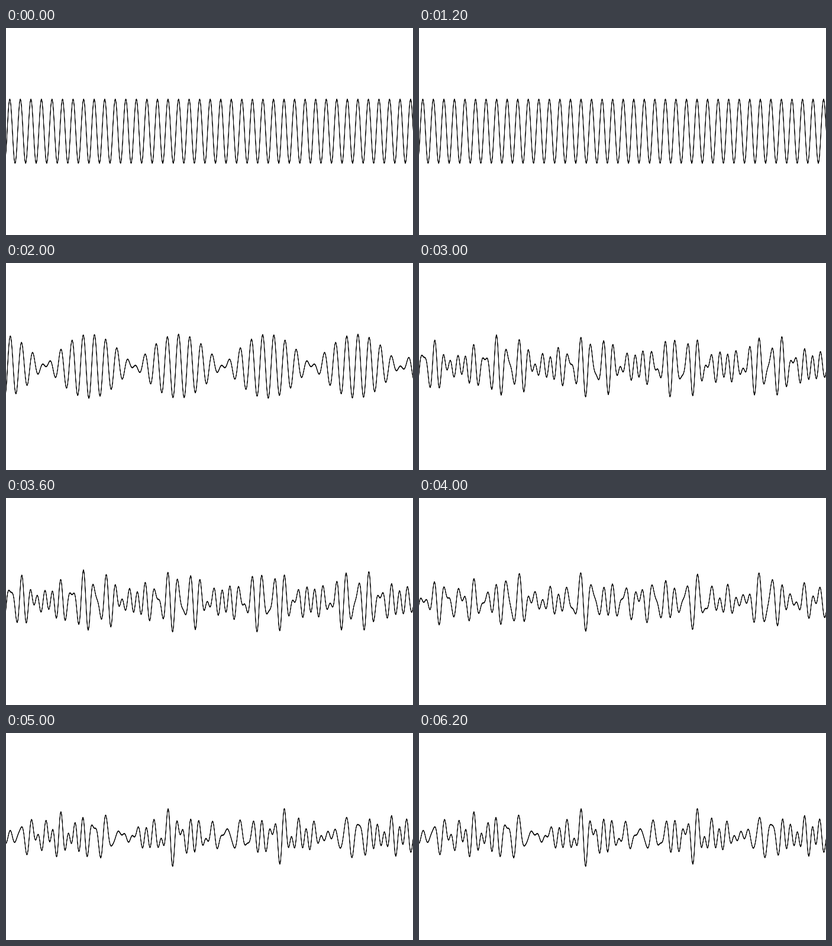
Animation of 688x350 px, one loop 7000 ms. Source, as a matplotlib script:

```python
import matplotlib.pyplot as plt
import numpy as np
from matplotlib.animation import FuncAnimation
from matplotlib.patches import Polygon

W, H, DPI = 688, 350, 100
MID, AMP = 174.5, 54
NIB = 0.65  # half height of the pen, on top of its outline

# (wavelength, position of one crest) of each tone, in pixels
TONES = [(17.83, 291.7), (20.23, 291.7), (13.02, 287.5),
         (25.13, 271.3), (12.17, 482.1)]
# number of tones mixed in each second of the loop
VOICES = [1, 1, 2, 3, 4, 5, 5]

x = np.arange(-4, W + 4, 0.25)


def mix(n):
    """Average of the first n tones, as pixel heights."""
    waves = [np.cos(2 * np.pi * (x - crest) / length)
             for length, crest in TONES[:n]]
    return MID - AMP * np.mean(waves, axis=0)


def ribbon(n):
    """Outline of the wave drawn with a tall, narrow pen."""
    y = mix(n)
    top = np.column_stack([x, y - NIB])
    bottom = np.column_stack([x, y + NIB])
    return np.vstack([top, bottom[::-1]])


fig = plt.figure(figsize=(W / DPI, H / DPI), dpi=DPI, facecolor="white")
ax = fig.add_axes([0, 0, 1, 1])
ax.set_xlim(0, W)
ax.set_ylim(H, 0)
ax.axis("off")

wave = Polygon(ribbon(1), closed=True, facecolor="black", edgecolor="black",
               linewidth=0.8 * 72 / DPI, joinstyle="round")
ax.add_patch(wave)


def update(second):
    wave.set_xy(ribbon(VOICES[second]))
    return [wave]


anim = FuncAnimation(fig, update, frames=len(VOICES), interval=1000,
                     repeat=True, repeat_delay=0, blit=False)
plt.show()
```
